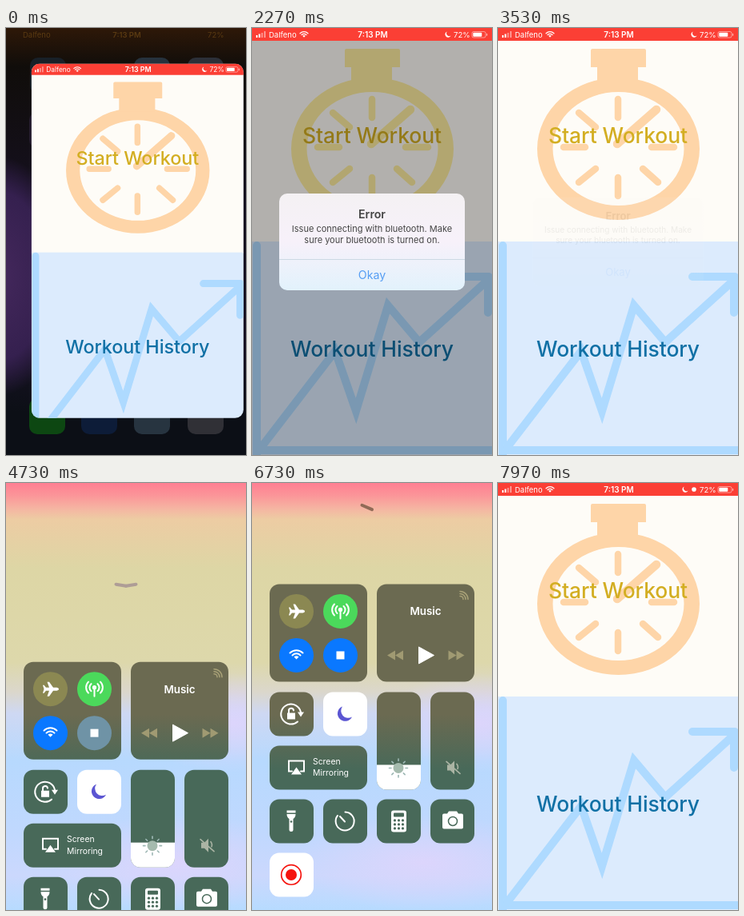
These frames come from a looping animation (300 by 534 pixels, 8 s). An HTML page:

```html
<!DOCTYPE html>
<html lang="en">
<head>
<meta charset="utf-8">
<title>Workout app</title>
<style>
html, body { margin: 0; width: 100%; height: 100%; overflow: hidden; background: #0d0b0c; }
svg { display: block; width: 100vw; height: 100vh; }
text { font-family: Inter, Roboto, sans-serif; }
.mid { text-anchor: middle; }
.big { font-size: 26.5px; font-weight: 500; letter-spacing: -.1px; }
.line { fill: none; stroke-linecap: round; }
.white { fill: #fff; }
.pen { fill: none; stroke: #fff; stroke-width: 2; stroke-linecap: round; }
</style>
</head>
<body>
<svg viewBox="0 0 300 534" preserveAspectRatio="none">
  <defs>
    <clipPath id="windowClip"><rect id="windowShape" width="300" height="534"/></clipPath>
    <clipPath id="sliderClip"><rect x="156" y="256" width="55" height="122" rx="12"/></clipPath>
    <linearGradient id="night" x2="0" y2="1">
      <stop stop-color="#2e1808"/><stop offset=".09" stop-color="#100d0a"/>
      <stop offset=".4" stop-color="#15101f"/><stop offset=".75" stop-color="#171223"/>
      <stop offset=".9" stop-color="#0c0f16"/>
    </linearGradient>
    <radialGradient id="glow">
      <stop stop-color="#44285c"/><stop offset=".7" stop-color="#35204f"/><stop offset="1" stop-color="#35204f" stop-opacity="0"/>
    </radialGradient>
    <linearGradient id="blur" x2="0" y2="1">
      <stop stop-color="#ff7f92"/><stop offset=".03" stop-color="#fb9699"/>
      <stop offset=".06" stop-color="#f5b5a2"/><stop offset=".085" stop-color="#edcca3"/>
      <stop offset=".2" stop-color="#ddd6a5"/><stop offset=".42" stop-color="#ddd8ab"/>
      <stop offset=".49" stop-color="#dbd7cc"/><stop offset=".54" stop-color="#ced8f3"/>
      <stop offset=".65" stop-color="#b7d9fe"/><stop offset=".82" stop-color="#c0d8fe"/>
      <stop offset=".92" stop-color="#cbd8fd"/><stop offset="1" stop-color="#b7dbff"/>
    </linearGradient>
    <radialGradient id="lavender">
      <stop stop-color="#dcd5fc"/><stop offset="1" stop-color="#dcd5fc" stop-opacity="0"/>
    </radialGradient>
    <linearGradient id="tone" gradientUnits="userSpaceOnUse" x1="0" y1="290" x2="0" y2="358">
      <stop stop-color="#6b6a51"/><stop offset="1" stop-color="#486959"/>
    </linearGradient>
    <linearGradient id="alertFill" x2="0" y2="1">
      <stop stop-color="#f4f1f3"/><stop offset=".5" stop-color="#f7f1fa"/><stop offset="1" stop-color="#e2f2fc"/>
    </linearGradient>
    <g id="wifi">
      <path class="white" d="M-3 3L0 6L3 3A4.2 4.2 0 0 0-3 3Z"/>
      <path class="pen" stroke-linecap="butt" d="M-5 1A7 7 0 0 1 5 1M-8-2A11.3 11.3 0 0 1 8-2"/>
    </g>
    <path id="moon" d="M-3-9A9.5 9.5 0 1 0 9 4A9 9 0 0 1-3-9Z"/>
    <path id="skip" d="M-10 0L0-6V6ZM0 0L10-6V6Z"/>
  </defs>

  <g id="home">
    <rect width="300" height="534" fill="url(#night)"/>
    <ellipse cx="-10" cy="310" rx="90" ry="150" fill="url(#glow)"/>
    <g id="homeIcons"></g>
    <g font-size="9.5" fill="#5a3a12">
      <text x="21" y="12">Dalfeno</text>
      <text class="mid" x="151" y="12" font-weight="600">7:13 PM</text>
      <text x="252" y="12">72%</text>
    </g>
  </g>

  <g id="app">
    <g clip-path="url(#windowClip)">
      <rect width="300" height="268" fill="#fefcf7"/>
      <rect y="267" width="300" height="267" fill="#dcebfd"/>
      <g id="watch">
        <path fill="currentColor" fill-rule="evenodd" d="M49 151a101.5 89 0 1 0 203 0a101.5 89 0 1 0-203 0M68.5 151a82 71 0 1 1 164 0a82 71 0 1 1-164 0"/>
        <path fill="currentColor" d="M118 26H183Q185 26 185 28V49H175V68H124V49H116V28Q116 26 118 26Z"/>
        <path class="line" stroke="currentColor" stroke-width="8.5" d="M150 89V112M150 187V210M82 149H109M192 149H220M101 106L122 124M101 193L122 176M181 176L200 193"/>
        <path class="line" stroke="currentColor" stroke-width="10.5" d="M149 145L198 102"/>
      </g>
      <g class="line" stroke="#aedaff" stroke-width="10">
        <path d="M6 272V534M6 528H300"/>
        <path stroke-miterlimit="10" d="M11 525L104 404L130 479L170 347L209 393L294 316M243 311H296M295 311V356"/>
      </g>
      <text class="mid big" x="150" y="143.5" fill="#d3ae22">Start Workout</text>
      <text class="mid big" x="150" y="410.5" fill="#1070a5">Workout History</text>
      <rect id="dim" y="16" width="300" height="518"/>
      <rect width="300" height="16" fill="#fb3f35"/>
      <g class="white" font-size="9.6">
        <path d="M5 9h2v3h-2zM8.300 7.500h2v4.500h-2z"/>
        <path opacity=".45" d="M11.600 6h2v6h-2zM15 4h2v8h-2z"/>
        <text x="21" y="11.800" font-size="9.5">Dalfeno</text>
        <use href="#wifi" transform="translate(65 8) scale(.62)"/>
        <text class="mid" x="151" y="11.800" font-size="10" font-weight="600">7:13 PM</text>
        <use id="statusMoon" href="#moon"/>
        <circle id="statusRadio" cx="245" cy="8" r="2.8"/>
        <text x="252" y="11.800">72%</text>
        <rect x="275" y="4.500" width="17" height="7.500" rx="2" fill="none" stroke="#fff" stroke-opacity=".6" stroke-width=".8"/>
        <rect x="276.300" y="5.700" width="11" height="5" rx="1"/>
        <rect x="293" y="6.800" width="1.200" height="3" rx=".6" opacity=".6"/>
      </g>
    </g>
    <g id="alert">
      <rect x="34" y="207" width="232" height="121" rx="10" fill="url(#alertFill)"/>
      <path d="M34 289.500H266" stroke="#c3d3df" stroke-width=".8"/>
      <g class="mid" fill="#444">
        <text x="150" y="237.500" font-size="14.2" font-weight="600">Error</text>
        <text x="150" y="255" font-size="11">Issue connecting with bluetooth. Make</text>
        <text x="150" y="269" font-size="11">sure your bluetooth is turned on.</text>
        <text x="150" y="314" font-size="14.2" fill="#559df3">Okay</text>
      </g>
    </g>
  </g>

  <g id="backdrop">
    <rect width="300" height="534" fill="url(#blur)"/>
    <ellipse cx="285" cy="300" rx="130" ry="62" fill="url(#lavender)"/>
    <ellipse cx="215" cy="475" rx="160" ry="60" fill="url(#lavender)"/>
  </g>
  <g id="center">
    <g id="chevron" class="line" stroke-width="4"><path id="wingL"/><path id="wingR"/></g>
    <g id="panels" fill="url(#tone)"></g>

    <circle cx="55.500" cy="155" r="21.500" fill="#8b8852"/>
    <circle cx="110.500" cy="155" r="21.500" fill="#4bd95b"/>
    <circle cx="55.500" cy="210" r="21.500" fill="#0a78ff"/>
    <circle id="radio" cx="110.500" cy="210" r="21.500"/>
    <path class="white" transform="translate(56 155)" d="M10 0C10-1.500 8-2 6-2H3L-2-9H-4.500L-2-2H-6L-8.500-5H-10L-8.500 0L-10 5H-8.500L-6 2H-2L-4.500 9H-2L3 2H6C8 2 10 1.500 10 0Z"/>
    <g transform="translate(110.500 153)">
      <circle class="white" r="2.600"/>
      <path class="pen" d="M0 1V11M-4-4.500A6 6 0 0 0-4 4.500M4-4.500A6 6 0 0 1 4 4.500M-7.500-7A10 10 0 0 0-7.500 7M7.500-7A10 10 0 0 1 7.500 7"/>
    </g>
    <use href="#wifi" x="55.500" y="209"/>
    <rect class="white" x="105.500" y="205" width="10" height="10"/>

    <text class="mid white" x="217" y="160" font-size="13.4" font-weight="600">Music</text>
    <path class="line" stroke="#a8a177" stroke-width="1.500" d="M260 136A4 4 0 0 1 264 140M260 133A7 7 0 0 1 267 140M260 130A10 10 0 0 1 270 140"/>
    <path class="white" stroke="#fff" stroke-linejoin="round" d="M208.500 199.500L227.500 210L208.500 220.500Z"/>
    <g fill="#a09a72">
      <use href="#skip" x="179" y="210"/>
      <use href="#skip" transform="translate(255.500 210) scale(-1 1)"/>
    </g>

    <path class="pen" d="M57 293A12.500 12.500 0 1 1 61 281"/>
    <path class="white" d="M57 281H65L61 287ZM44 282h10v8h-10z"/>
    <path class="pen" stroke-width="1.500" d="M46 282V279.500A3 3 0 0 1 52 279"/>
    <use href="#moon" x="116" y="283" fill="#5b55d2"/>

    <rect class="white" x="156" y="347" width="55" height="32" clip-path="url(#sliderClip)"/>
    <circle cx="183" cy="351" r="6.500" fill="#a5bbae"/>
    <g id="rays" stroke="#9db7b4" stroke-width="1.600" stroke-linecap="round"></g>
    <path fill="#abb4a4" d="M244 347h4l5-5v17l-5-5h-4z"/>
    <path class="line" stroke="#abb4a4" stroke-width="1.600" d="M243 343L260 358M256 346A6 6 0 0 1 257 352"/>

    <path class="pen" stroke-width="1.600" d="M50 355H46V342H65V355H61"/>
    <path class="white" d="M55.500 350L62 359H49Z"/>
    <g class="white" font-size="10.4">
      <text x="76" y="346.500">Screen</text>
      <text x="76" y="361">Mirroring</text>
    </g>

    <path class="white" d="M43.500 404h11v3h-11zM43.500 408.500h11q0 4-3 6v14q0 2-2.500 2t-2.500-2v-14q-3-2-3-6z"/>
    <circle cx="49" cy="418" r="1.300" fill="#486959"/>
    <path class="pen" stroke-width="2.400" d="M116.500 406A11.500 11.500 0 1 1 107 410.500M116 418L110 411.500"/>
    <rect class="white" x="174" y="404" width="19" height="27" rx="3"/>
    <g id="keys" fill="#486959"><rect x="177" y="407" width="13" height="5" rx="1"/></g>
    <path class="white" d="M240 408H244L246 405H256L258 408H262Q264 408 264 410V425Q264 427 262 427H240Q238 427 238 425V410Q238 408 240 408Z"/>
    <circle cx="251" cy="417.500" r="5.500" fill="none" stroke="#486959" stroke-width="1.500"/>

    <circle cx="49" cy="484.500" r="12.300" fill="none" stroke="#f5140e" stroke-width="1.700"/>
    <circle cx="49" cy="484.500" r="7" fill="#f5140e"/>
  </g>
</svg>
<script>
const LOOP = 8000;
const el = id => document.getElementById(id);
const set = (id, attrs) => {
  for (const name in attrs) el(id).setAttribute(name, attrs[name]);
};
const add = (id, tag, attrs) => {
  const node = document.createElementNS('http://www.w3.org/2000/svg', tag);
  for (const name in attrs) node.setAttribute(name, attrs[name]);
  el(id).append(node);
};

// Piecewise linear value over [time, value] steps.
function track(steps, t) {
  const i = steps.findIndex(step => step[0] > t);
  if (i < 0) return steps[steps.length - 1][1];
  if (i === 0) return steps[0][1];
  const [t0, v0] = steps[i - 1], [t1, v1] = steps[i];
  return v0 + (v1 - v0) * (t - t0) / (t1 - t0);
}
const smooth = k => k * k * (3 - 2 * k);
const mix = (a, b, k) => `rgb(${a.map((v, i) => Math.round(v + (b[i] - v) * k))})`;

const SLIDE = [[4280, 420], [4450, 270], [4600, 165], [4730, 103], [4900, 45], [5100, 12], [5300, 0],
  [6680, 0], [6730, 5], [6850, 60], [7000, 200], [7200, 420]];
const BACKDROP = [[4250, 0], [4620, 1], [6760, 1], [7250, 0]];
const ALERT = [[1500, 0], [1750, 1], [3200, 1], [3560, 0]];
const ALERT_SCALE = [[1500, 1.15], [1750, 1], [3200, 1], [3530, .92]];
const DIM = [[1500, 0], [1800, 1], [3180, 1], [3520, 0]];
const RADIO_ON = 6150;

function build() {
  const icons = [[30, 37, '#182028'], [160, 37, '#26323d'], [227, 37, '#2c3038'], [29, 105, '#231a2c'],
    [29, 463, '#0d4712'], [94, 463, '#0d1c38'], [160, 463, '#273440'], [227, 463, '#303036']];
  for (const [x, y, fill] of icons) add('homeIcons', 'rect', { x, y, width: 45, height: 45, rx: 10, fill });

  const panels = [[22, 121, 122, 122], [156, 121, 122, 122], [22, 256], [89, 256, 55, 55, '#fff'],
    [156, 256, 55, 122], [223, 256, 55, 122], [22, 323, 122, 55],
    [22, 390], [89, 390], [156, 390], [223, 390], [22, 457, 55, 55, '#fff']];
  for (const [x, y, width = 55, height = 55, fill = 'url(#tone)'] of panels)
    add('panels', 'rect', { x, y, width, height, rx: 12, fill });

  for (let i = 0; i < 8; i++)
    add('rays', 'path', { d: 'M9 0H11.5', transform: `translate(183 351) rotate(${i * 45})` });
  for (let i = 0; i < 9; i++)
    add('keys', 'circle', { cx: 178.5 + i % 3 * 5, cy: 416.5 + Math.floor(i / 3) * 5, r: 1.6 });
}

function drawApp(t) {
  const away = (1 - Math.min(t / 330, 1)) ** 3;
  const scale = 1 - .117 * away;
  set('app', { transform: `translate(${32 * away} ${45 * away}) scale(${scale})` });
  set('windowShape', { height: 534 - 33 * away, rx: 12 * Math.sqrt(away) });
  set('home', { visibility: away > 0 ? 'visible' : 'hidden' });

  const dim = smooth(track(DIM, t));
  set('dim', { opacity: .3 * dim });
  el('watch').style.color = mix([254, 213, 168], [255, 238, 160], dim);

  const zoom = track(ALERT_SCALE, t);
  set('alert', {
    opacity: track(ALERT, t),
    transform: `translate(150 267) scale(${zoom}) translate(-150 -267)`
  });

  const on = t >= RADIO_ON;
  set('statusRadio', { visibility: on ? 'visible' : 'hidden' });
  set('statusMoon', { transform: `translate(${on ? 234 : 245} 8) scale(.4)` });
}

function drawCenter(t) {
  const y = track(SLIDE, t);
  set('backdrop', { opacity: smooth(track(BACKDROP, t)) });
  set('center', { transform: `translate(0 ${y})`, visibility: y < 420 ? 'visible' : 'hidden' });
  set('tone', { gradientTransform: `translate(0 ${-y})` });

  const settled = track([[4730, 0], [5250, 1]], t);
  const bend = 1 + 1.7 * settled;
  set('chevron', {
    stroke: mix([174, 157, 150], [145, 107, 87], settled),
    opacity: track([[4450, 0], [4700, 1], [6900, 1], [7050, 0]], t)
  });
  set('wingL', { d: `M137.500 ${25 - bend}L150 ${25 + bend}` });
  set('wingR', { d: `M150 ${25 + bend}L162.500 ${25 - bend}`, opacity: track([[6680, 1], [6730, 0]], t) });

  const off = mix([111, 147, 166], [139, 136, 82], track([[4730, 0], [5200, 1]], t));
  set('radio', { fill: t >= RADIO_ON ? '#0a78ff' : off });
}

build();
const start = performance.now();
function frame() {
  const t = (performance.now() - start) % LOOP;
  drawApp(t);
  drawCenter(t);
  requestAnimationFrame(frame);
}
frame();
</script>
</body>
</html>
```
